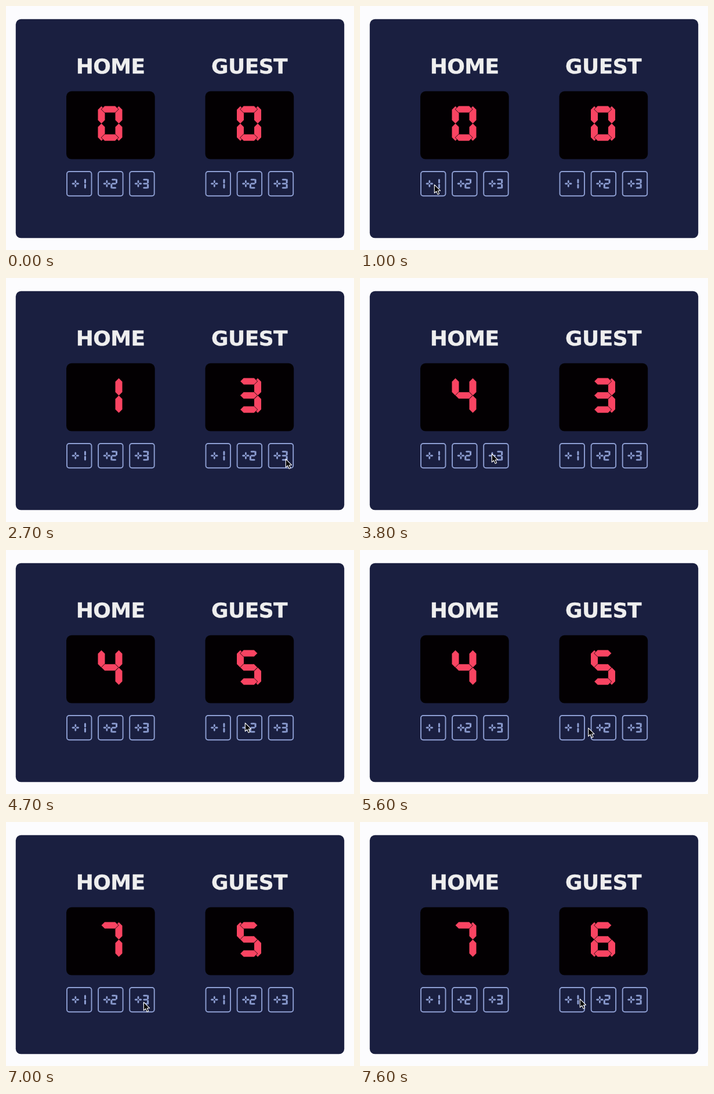
These frames come from a looping animation (600x423 px, 8 s). An HTML page with a canvas:

```html
<!DOCTYPE html>
<html lang="en">
<head>
<meta charset="utf-8">
<title>Scoreboard</title>
<style>
  html, body { margin: 0; width: 100%; height: 100%; overflow: hidden; background: #fcfcfe; }
  canvas { display: block; width: 600px; height: 423px; }
</style>
</head>
<body>
<canvas id="stage" width="600" height="423"></canvas>
<script>
const ctx = document.getElementById('stage').getContext('2d');
const LOOP = 8000, STEP = 100;
const COLORS = { page: '#fcfcfe', card: '#1a1f40', label: '#eeeeee', box: '#030002', score: '#f94462', key: '#8e9fd3' };

// Lit segments per digit: a top, b/c right, d bottom, e/f left, g middle
const DIGITS = ['abcdef', 'bc', 'abged', 'abgcd', 'fgbc', 'afgcd', 'afgedc', 'abc'];

// Pointer stops; a click adds points to a team
const START = { x: 565, y: 384 };
const stops = [
  { start: 400, x: 127, y: 309, sag: 5, click: 1200, team: 'HOME', add: 1 },
  { start: 1300, x: 497, y: 350, sag: 54 },
  { start: 1900, x: 481, y: 313, sag: 0, click: 2200, team: 'GUEST', add: 3 },
  { start: 2700, x: 226, y: 304, sag: 5, click: 3800, team: 'HOME', add: 3 },
  { start: 3800, x: 411, y: 299, sag: 7, click: 4700, team: 'GUEST', add: 2 },
  { start: 5500, x: 218, y: 309, sag: 26, click: 6500, team: 'HOME', add: 3 },
  { start: 6900, x: 378, y: 306, sag: 8, click: 7500, team: 'GUEST', add: 1 }
];

function roundRect(x, y, w, h, r) {
  ctx.beginPath();
  ctx.roundRect(x, y, w, h, r);
}

function poly(points) {
  ctx.beginPath();
  points.forEach(([x, y]) => ctx.lineTo(x, y));
  ctx.closePath();
}

function segment(cx, cy, half, thick, vertical) {
  const inner = half - thick;
  const shape = [[-half, 0], [-inner, -thick], [inner, -thick], [half, 0], [inner, thick], [-inner, thick]];
  poly(shape.map(([u, v]) => vertical ? [cx + v, cy + u] : [cx + u, cy + v]));
  ctx.fill();
}

function digit(n, x, y, scale, thick, color, gap) {
  const lit = name => DIGITS[n].includes(name);
  ctx.save();
  ctx.translate(x, y);
  ctx.scale(scale, scale);
  ctx.fillStyle = color;
  ctx.strokeStyle = gap;
  ctx.lineWidth = 0.8;
  [...'fbec'].forEach((name, i) => {
    if (lit(name)) segment(6 + 30 * (i % 2), 15.7 + 30 * (i >> 1), 15, thick, true);
  });
  [...'agd'].forEach((name, i) => {
    if (!lit(name)) return;
    segment(20.7, 6.1 + 24.5 * i, 15, thick, false);
    ctx.stroke();
  });
  ctx.restore();
}

function plus(cx, cy) {
  ctx.fillStyle = COLORS.key;
  for (const side of [-1, 1]) {
    segment(cx + side * 3.6, cy, 2.9, 1.4, false);
    segment(cx, cy + side * 3.6, 2.9, 1.4, true);
  }
}

function button(x, n) {
  roundRect(x + 1, 287, 42.5, 42.3, 4);
  ctx.strokeStyle = COLORS.key;
  ctx.lineWidth = 1.9;
  ctx.stroke();
  plus(x + 15.8, 308);
  digit(n, x + 22, 299.2, 0.29, 5.2, COLORS.key, COLORS.card);
}

function team(x, label, score) {
  ctx.fillStyle = ctx.strokeStyle = COLORS.label;
  ctx.font = 'bold 36px "DejaVu Sans", Verdana, sans-serif';
  ctx.letterSpacing = '-0.6px';
  ctx.textAlign = 'center';
  ctx.lineWidth = 0.4;
  ctx.fillText(label, x + 76, 117);
  ctx.strokeText(label, x + 76, 117);
  roundRect(x, 147.8, 152.7, 117.8, 9);
  ctx.fillStyle = COLORS.box;
  ctx.fill();
  digit(score, x + 54.5, 173, 1, 6, COLORS.score, COLORS.box);
  for (let n = 1; n <= 3; n++) button(x + (n - 1) * 54.1, n);
}

function pointerAt(t) {
  let { x, y } = START;
  for (const s of stops) {
    if (t <= s.start) break;
    const time = Math.min(600, 270 + 1.3 * Math.hypot(s.x - x, s.y - y));
    const k = Math.min(1, (t - s.start) / time);
    const p = k * k * (3 - 2 * k);
    x += (s.x - x) * p;
    y += (s.y - y) * p + s.sag * Math.sin(Math.PI * p);
  }
  return [x, y];
}

function pointer(x, y) {
  ctx.save();
  ctx.translate(x + 1.3, y + 0.9);
  ctx.scale(0.93, 0.93);
  poly([[0, 0], [0, 15.5], [3.6, 12.2], [6.2, 18], [8.9, 16.8], [6.4, 11.2], [11, 11]]);
  ctx.fillStyle = '#000';
  ctx.strokeStyle = '#fff';
  ctx.lineWidth = 1.2;
  ctx.lineJoin = 'round';
  ctx.fill();
  ctx.stroke();
  ctx.restore();
}

const scoreAt = (name, t) =>
  stops.reduce((sum, s) => s.team === name && t >= s.click ? sum + s.add : sum, 0);

function draw(t) {
  ctx.fillStyle = COLORS.page;
  ctx.fillRect(0, 0, 600, 423);
  roundRect(16.8, 22.8, 566.4, 379.5, 9);
  ctx.fillStyle = COLORS.card;
  ctx.fill();
  team(104, 'HOME', scoreAt('HOME', t));
  team(343.5, 'GUEST', scoreAt('GUEST', t));
  if (t >= stops[0].start) pointer(...pointerAt(t));
}

const begin = performance.now();
function tick() {
  const t = (performance.now() - begin) % LOOP;
  draw(Math.floor(t / STEP) * STEP);
  requestAnimationFrame(tick);
}
tick();
</script>
</body>
</html>
```
